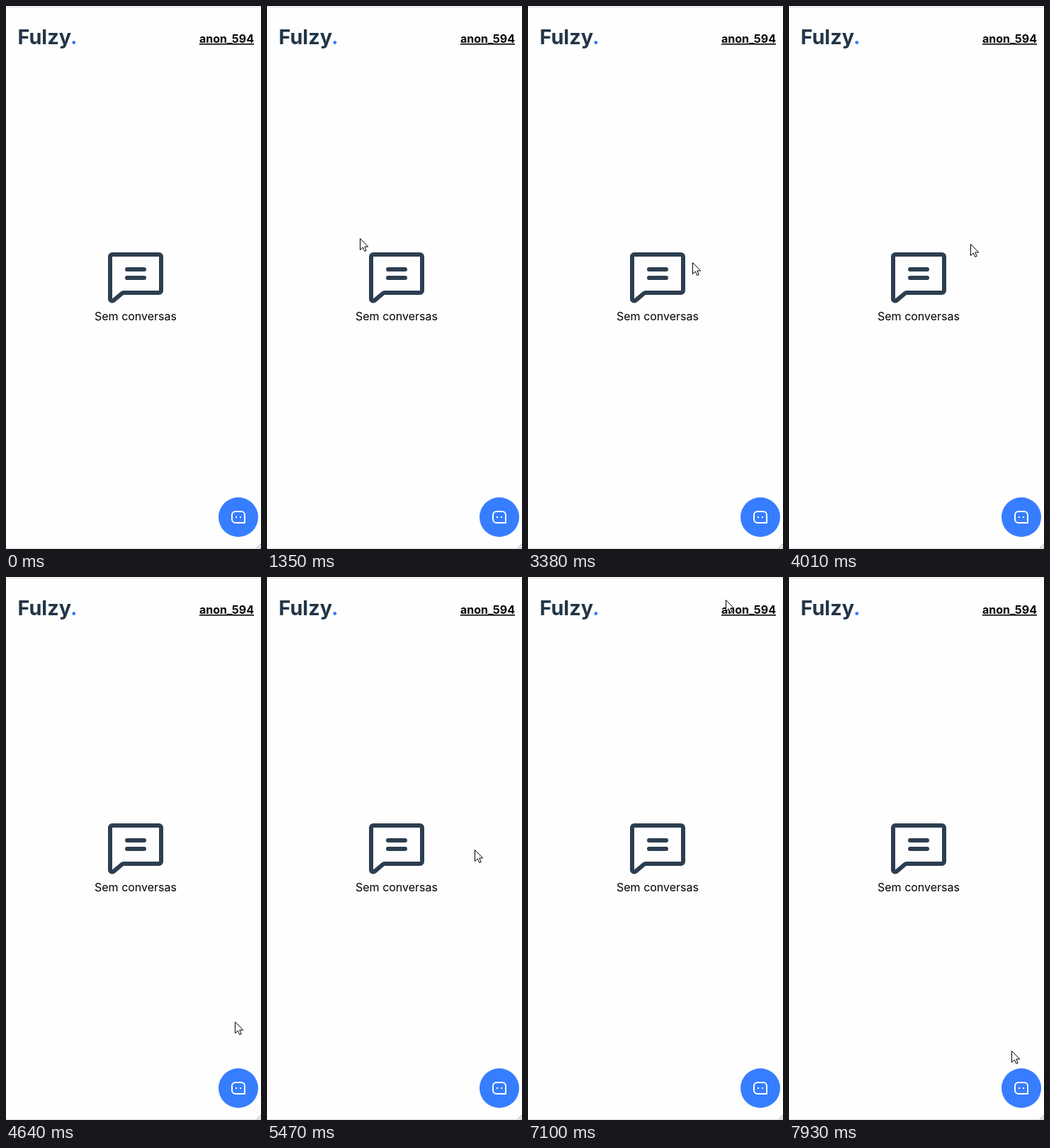
Recreate the animation shown at these times as an HTML page. Size 360 by 767 pixels, loop 8000 ms.

```html
<!DOCTYPE html>
<html lang="pt">
<head>
<meta charset="utf-8">
<title>Conversas</title>
<style>
  html, body { margin: 0; width: 100%; height: 100%; overflow: hidden; background: #fefefe; }
  svg { display: block; width: 360px; height: 767px; }
  text { font-family: Inter, sans-serif; font-size: 16px; }
  .logo { font-size: 28.8px; font-weight: 700; fill: #213547; }
  .user { font-weight: 700; text-anchor: end; text-decoration: underline; }
  .bubble { fill: none; stroke: #2c3e50; stroke-width: 16; stroke-linecap: round; stroke-linejoin: round; }
</style>
</head>
<body>
<svg viewBox="0 0 360 767">
  <path d="M0 1.5H360M0 766.5H360" stroke="#dcdcdc"/>
  <path d="M354 766L360 760M358 766L360 764" stroke="#999"/>

  <text class="logo" x="16.5" y="53.5">Fulzy<tspan fill="#377dff">.</tspan></text>
  <text class="user" x="350" y="52">anon_594</text>

  <g class="bubble" transform="translate(135 330) scale(.375)">
    <path d="M77 202L45 229A8 8 0 0 1 32 223V64a8 8 0 0 1 8-8H216a8 8 0 0 1 8 8V192a8 8 0 0 1-8 8H82.500A8 8 0 0 0 77 202Z"/>
    <path d="M96 112H160M96 144H160"/>
  </g>
  <text x="183" y="444" text-anchor="middle">Sem conversas</text>

  <circle cx="328" cy="722" r="28" fill="#377dff"/>
  <path d="M324 714h8a5 5 0 0 1 5 5v11h-13a5 5 0 0 1-5-5v-6a5 5 0 0 1 5-5z" fill="none" stroke="#fff" stroke-width="2"/>
  <path d="M324 721h2v2h-2zM330 721h2v2h-2z" fill="#fff"/>

  <path id="cursor" d="M.5 .5V16.500L4.300 13L6.800 18.500L9.200 17.500L6.800 12H11.700Z" fill="#fff" stroke="#000"/>
</svg>
<script>
const LOOP = 8000, STEP = 70, PHASE = 20;
const cursor = document.getElementById("cursor");

// Turning points of the pointer: [time, x, y]
const turns = [
  [520, 315, 729], [1210, 120, 303], [1350, 131, 328], [1750, 159, 300],
  [2540, 127, 288], [2820, 260, 360], [3100, 187, 300], [3380, 232, 362],
  [3800, 243, 282], [4640, 323, 628], [4990, 328, 723], [5470, 291, 370],
  [6040, 290, 0], [6320, 269, 32], [6600, 348, 45], [7240, 268, 30],
  [7930, 314, 669]
];

const mix = (a, b, k) => Math.round(a + (b - a) * k);
const ease = u => u * u * (3 - 2 * u);

function pointerAt(time) {
  const next = Math.max(1, turns.findIndex(turn => turn[0] >= time));
  const [t0, x0, y0] = turns[next - 1], [t1, x1, y1] = turns[next];
  const k = ease(Math.max(0, (time - t0) / (t1 - t0)));
  return [mix(x0, x1, k), mix(y0, y1, k)];
}

function frame() {
  const time = performance.now() % LOOP;
  const sample = Math.floor((time - PHASE) / STEP) * STEP + PHASE;
  const [x, y] = pointerAt(sample);
  cursor.setAttribute("visibility", time < turns[0][0] ? "hidden" : "visible");
  cursor.setAttribute("transform", `translate(${x} ${y})`);
  requestAnimationFrame(frame);
}
frame();
</script>
</body>
</html>
```
